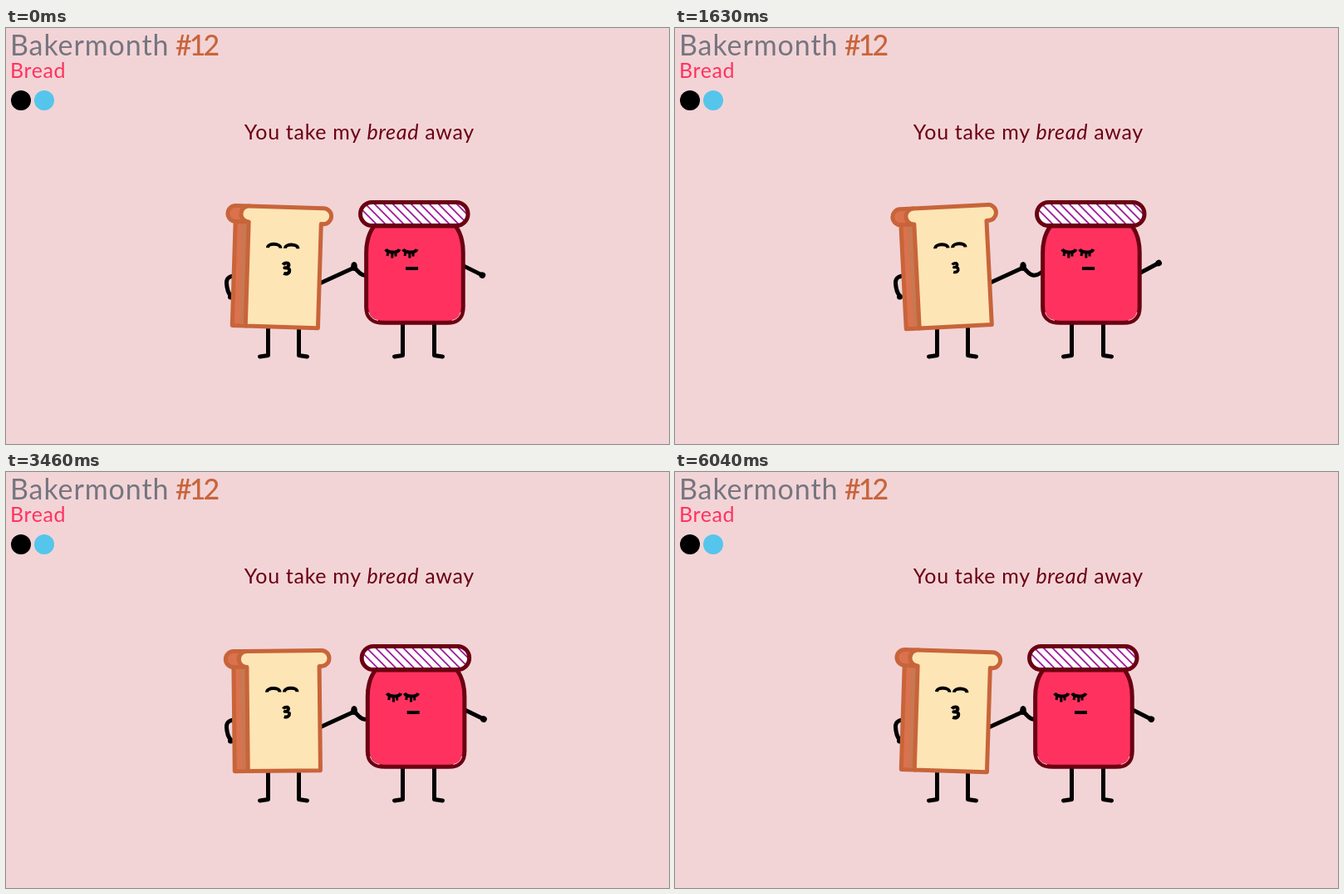
An HTML page that plays this animation: 798 by 500 pixels, repeating every 6.14 s.

```html
<!DOCTYPE html>
<html lang="en">
<head>
<meta charset="utf-8">
<title>Bread and jam</title>
<style>
  html, body { margin: 0; width: 100%; height: 100%; overflow: hidden; background: #f2d4d7; }
  svg { display: block; width: 798px; height: 500px; }
  text { font-family: Lato, "Open Sans", sans-serif; font-weight: 400; }
  .title { font-size: 34px; fill: #75757f; letter-spacing: .9px; }
  .number { font-weight: 500; fill: #c8643a; letter-spacing: -3px; }
  .sub { font-size: 25px; fill: #ff325f; letter-spacing: .6px; }
  .lyric { font-size: 25px; fill: #6b0012; letter-spacing: .7px; text-anchor: middle; }
  .ink { fill: none; stroke: #000; stroke-width: 5; stroke-linecap: round; stroke-linejoin: round; }
  .crust { stroke: #c8643a; stroke-width: 5; stroke-linejoin: round; }
  .glass { stroke: #6b0012; stroke-width: 5; stroke-linejoin: round; }
  .thin { stroke-width: 4; }
  .flat { stroke-linecap: butt; }
  .lash { stroke-width: 3; }
  .shine { fill: none; stroke: #f9ccd4; stroke-width: 1; stroke-linecap: round; }
</style>
</head>
<body>
<svg viewBox="0 0 798 500">
  <defs>
    <clipPath id="lidClip"><rect x="426.5" y="209.5" width="129.5" height="28" rx="14"/></clipPath>
    <g id="eye">
      <path class="ink thin flat" d="M457 266Q459 269.5 465.5 269.5Q472 269.5 473.5 266"/>
      <path class="ink lash flat" d="M460 268L459 274M464.8 270V276.5M469 270V274.5"/>
    </g>
  </defs>

  <text class="title" x="5" y="33">Bakermonth</text>
  <text class="title number" x="204" y="33">#12</text>
  <text class="sub" x="5" y="60">Bread</text>
  <circle cx="18" cy="87" r="12"/>
  <circle cx="46" cy="87" r="12" fill="#55c5ec"/>
  <text class="lyric" x="425.3" y="134">You take my <tspan font-style="italic">bread</tspan> away</text>

  <!-- legs and joined arms -->
  <path class="ink" d="M315.5 350V393.5L305.5 395M352.5 350V393.5L362.5 395M477.5 345V393.5L467.5 395M515.5 345V393.5L525.5 395"/>
  <path class="ink" d="M282 297C270 298 265 299 265.5 307C266 315 268 319 270.5 322"/>
  <circle cx="270.5" cy="323" r="3.5"/>
  <path class="ink" d="M360 315L418 288.5"/>
  <path class="ink" d="M419 287C427 298 434 304 450 285"/>
  <ellipse cx="419" cy="286.5" rx="3.8" ry="5.5"/>

  <g id="bread">
    <path class="crust" fill="#da724e" d="M274.5 359.2V234a9.5 9.5 0 0 1 0-19H291V359.2Z"/>
    <path fill="#c87852" d="M282 236H290V357H284Z"/>
    <path class="crust" d="M274.5 234H290"/>
    <path class="crust" fill="#fde5b5" d="M290.5 359.2V234a9.5 9.5 0 0 1 0-19H380.2a9.5 9.5 0 0 1 0 19H377.7V359.2Z"/>
    <path class="ink thin flat" d="M314.3 264.5C314.3 258.5 329.7 258.5 329.7 264.5M335.3 264.5C335.3 258.5 350.7 258.5 350.7 264.5"/>
    <path id="kiss" class="ink thin flat" d="M-3.5-4Q-2-6.5 2-6Q5-4 1-.5H-1.5H1Q5 0 4 4Q2 7.5-2.5 6"/>
  </g>

  <g id="jar">
    <g id="arm"><path class="ink" d="M543 290H575"/><circle cx="575" cy="290" r="3.8"/></g>
    <path class="glass" fill="#ff325f" d="M443 238C437 246 433.6 258 433.6 270V335Q433.6 354.3 455 354.3H531Q550.2 354.3 550.2 335V270C550.2 258 547 246 541 238Z"/>
    <path class="shine" d="M436.7 342Q439 350 447.5 351.4M547 342Q545 350 537 351.4"/>
    <g clip-path="url(#lidClip)">
      <rect x="426" y="209" width="130" height="29" fill="#fff"/>
      <path id="hatch" stroke="#a01a9c" stroke-width="1.8"/>
    </g>
    <rect class="glass" fill="none" x="426.5" y="209.5" width="129.5" height="28" rx="14"/>
    <use href="#eye"/>
    <use href="#eye" x="21"/>
    <path class="ink thin flat" d="M481 289H496"/>
  </g>
</svg>

<script>
  const LOOP = 6140, CYCLE = 6040, LEAD = 262;
  const $ = id => document.getElementById(id);

  // Steps as [share of the cycle, value], joined by straight lines.
  const lean = [[0, 3.2], [.25, -5], [.5, 3.2], [.75, -5], [1, 3.2]];
  const pout = [[0, 1.08], [.25, .8], [.5, 1.08], [.75, .8], [1, 1.08]];
  const slide = [[0, -2.7], [.25, 13], [.5, -2.7], [.625, 2], [.75, -2.7], [.875, 2], [1, -2.7]];
  const wave = [[0, 43], [.25, -52], [.5, 43], [.625, 25], [.75, 43], [.875, 25], [1, 43]];

  function at(steps, p) {
    const i = steps.findIndex(step => step[0] > p);
    const [p0, a] = steps[i - 1], [p1, b] = steps[i];
    return a + (b - a) * (p - p0) / (p1 - p0);
  }

  let lines = "";
  for (let x = 395; x < 560; x += 11) lines += `M${x} 207l34 34`;
  $("hatch").setAttribute("d", lines);

  const move = (id, value) => $(id).setAttribute("transform", value);

  function draw(now) {
    const t = Math.min(now % LOOP, CYCLE);
    const p = (t + LEAD) % CYCLE / CYCLE;
    move("bread", `rotate(${at(lean, p)} 327 287)`);
    move("kiss", `translate(337 288.5) scale(${at(pout, p)})`);
    move("jar", `translate(${at(slide, p)} 0)`);
    move("arm", `rotate(${at(wave, p)} 559 290)`);
  }

  const start = performance.now();
  function tick() {
    draw(performance.now() - start);
    requestAnimationFrame(tick);
  }
  tick();
</script>
</body>
</html>
```
